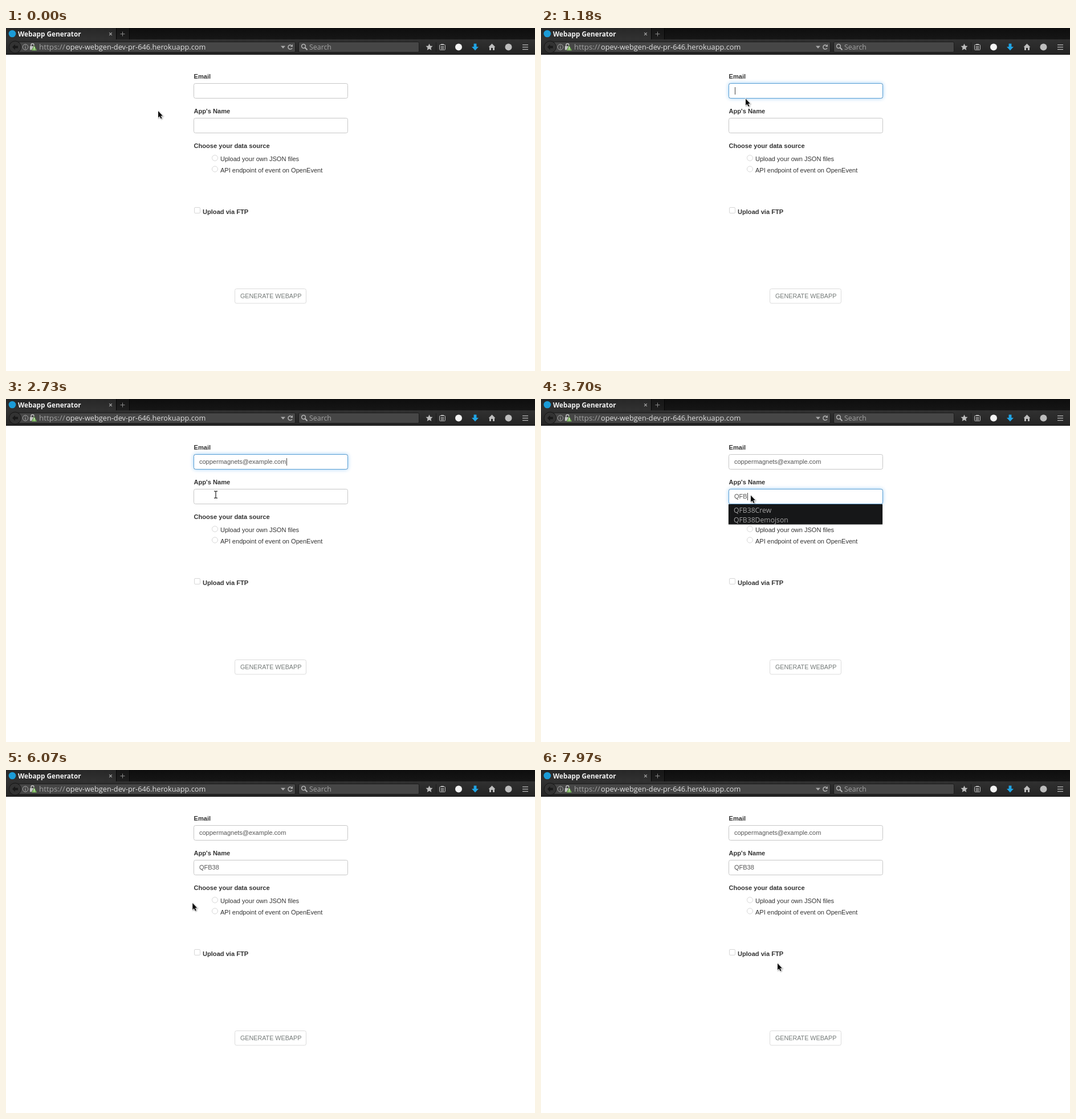
An HTML page with a canvas for the animation above (8 s loop, 928 by 603 pixels).

```html
<!DOCTYPE html>
<html lang="en">
<head>
<meta charset="utf-8">
<title>Webapp Generator</title>
<style>
  html, body { margin: 0; width: 100%; height: 100%; overflow: hidden; background: #fff; }
  canvas { display: block; }
</style>
</head>
<body>
<canvas id="stage" width="928" height="603"></canvas>
<script>
const ctx = document.getElementById('stage').getContext('2d', { alpha: false });
const LOOP = 8000;
const PAGE = '"Liberation Sans", Arial, sans-serif';
const CHROME = '"Open Sans", "Noto Sans", sans-serif';
const TEXT = '#555';
const EMAIL = 'coppermagnets@example.com';
const EMAIL_ROWS = ['coppermagnets', EMAIL, 'coppermagnets@example.org',
  'copperkettle@example.com', 'cobaltgarden@example.net', 'cedarwindow@example.org'];
const APP_ROWS = ['QFB38Crew', 'QFB38Demojson', 'Quartz'];
const ROW = 17.7;

// Pointer path: time, x, y
const PATH = [
  [0, 267, 146], [50, 267, 146], [430, 343, 109], [560, 351, 106], [830, 351, 106],
  [1030, 359, 124.5], [1710, 359, 124.5], [2300, 366, 152], [2450, 367, 158],
  [2700, 368, 168], [3490, 368, 169.5], [5310, 368, 169.5], [5510, 150, 239],
  [5630, 150, 239], [5800, 196, 244], [6070, 327, 234], [6150, 349, 236],
  [6920, 432, 456], [6960, 433, 465], [7850, 433, 465], [7890, 430, 438],
  [7970, 415, 340], [8000, 415, 340]
];

const within = (t, a, b) => t >= a && t < b;
const ramp = (t, start) => Math.min(1, Math.max(0, (t - start) / 150));

function pointerAt(t) {
  const i = Math.max(1, PATH.findIndex(p => p[0] > t));
  const [t0, x0, y0] = PATH[i - 1], [t1, x1, y1] = PATH[i];
  const k = (t - t0) / (t1 - t0);
  return { x: x0 + (x1 - x0) * k, y: y0 + (y1 - y0) * k };
}

function text(str, x, y, font, color) {
  ctx.font = font;
  ctx.fillStyle = color;
  ctx.fillText(str, x, y);
}

function rect(x, y, w, h, color) {
  ctx.fillStyle = color;
  ctx.fillRect(x, y, w, h);
}

function box(x, y, w, h, r, fill, stroke, width = 1) {
  ctx.beginPath();
  ctx.roundRect(x, y, w, h, r);
  paint(fill, stroke, width);
}

function disc(x, y, r, fill, stroke, width = 1) {
  ctx.beginPath();
  ctx.arc(x, y, r, 0, Math.PI * 2);
  paint(fill, stroke, width);
}

function shape(d, x, y, fill, stroke, width = 1) {
  ctx.save();
  ctx.translate(x, y);
  const path = new Path2D(d);
  if (stroke) { ctx.strokeStyle = stroke; ctx.lineWidth = width; ctx.stroke(path); }
  if (fill) { ctx.fillStyle = fill; ctx.fill(path); }
  ctx.restore();
}

function paint(fill, stroke, width) {
  if (fill) { ctx.fillStyle = fill; ctx.fill(); }
  if (stroke) { ctx.strokeStyle = stroke; ctx.lineWidth = width; ctx.stroke(); }
}

function gradient(y0, y1, from, to) {
  const g = ctx.createLinearGradient(0, y0, 0, y1);
  g.addColorStop(0, from);
  g.addColorStop(1, to);
  return g;
}

function drawTabs() {
  rect(0, 0, 928, 20, gradient(0, 20, '#0e0e0e', '#161616'));
  rect(0, 0, 193, 20, gradient(0, 20, '#272727', '#313131'));
  rect(193, 0, 1, 20, '#050505');
  rect(194, 0, 22, 20, gradient(0, 20, '#161616', '#1f1f1f'));
  rect(216, 0, 1, 20, '#050505');
  disc(11, 10, 6.3, '#1b9cd8');
  text('Webapp Generator', 21, 14.5, `bold 11.75px ${CHROME}`, '#f2f2f2');
  shape('M-2.3-2.3 2.3 2.3M2.3-2.3-2.3 2.3', 183.5, 10.5, null, '#aaa', 1.2);
  shape('M-4 0H4M0-4V4', 204.5, 10.5, null, '#8a8a8a');
}

function drawAddressBar() {
  rect(0, 20, 928, 27, gradient(20, 46, '#313131', '#242424'));
  rect(0, 46, 928, 1, '#101010');
  box(18.5, 24.5, 489, 18, 2, '#464646', '#1b1b1b');
  box(513.5, 24.5, 211, 18, 2, '#464646', '#1b1b1b');

  disc(16, 33.5, 10.5, '#333', '#151515');
  shape('M-5 0 0-5V-2H5V2H0V5Z', 16, 33.5, '#191919');
  disc(34, 33.5, 4.8, null, '#a8a8a8');
  rect(33.5, 32.5, 1, 4, '#b0b0b0');
  rect(33.5, 30.5, 1, 1, '#b0b0b0');
  shape('M-2.5 0V-2A2.5 2.5 0 0 1 2.5-2V0', 46.5, 32, null, '#c4c4c4', 1.4);
  rect(42, 32, 9, 6.5, '#c4c4c4');
  shape('M0-6 4.5 3H-4.5Z', 49.5, 36.5, '#79b75a', '#444');
  rect(49, 33.5, 1, 3, '#fff');
  rect(49, 37.5, 1, 1, '#fff');

  text('https://', 58, 38, `13.4px ${CHROME}`, '#a2a2a2');
  text('opev-webgen-dev-pr-646.herokuapp.com', 105, 38, `12.75px ${CHROME}`, '#e0e0e0');
  shape('M-4-2H4L0 2.5Z', 486, 33.5, '#aaa');
  shape('M3.3-1.8A3.7 3.7 0 1 0 3.4 1.8', 498.5, 33.5, null, '#aaa', 1.6);
  shape('M4.5-5V-.5H0Z', 498.5, 33.5, '#aaa');
  disc(522, 32, 3.4, null, '#b5b5b5', 1.5);
  shape('M0 0 4 4', 524.5, 34.5, null, '#b5b5b5', 1.9);
  text('Search', 532, 38, `12.4px ${CHROME}`, '#a2a2a2');
}

function drawToolbarIcons() {
  const ink = '#bdbdbd';
  shape('M0-6 1.8-2.1 6-1.7 2.9 1.2 3.8 5.4 0 3.2-3.8 5.4-2.9 1.2-6-1.7-1.8-2.1Z', 742.5, 33.5, ink);
  rect(754, 25, 1, 17, '#1c1c1c');
  box(760.5, 29.5, 10, 9, 1, null, ink);
  rect(763, 28, 5, 2, ink);
  for (const y of [32, 34, 36]) rect(762.5, y, 6, 1, ink);
  disc(794, 33.5, 6, '#f4f4f4');
  shape('M-2.4-6H2.4V-.5H6L0 6-6-.5H-2.4Z', 823, 33.5, '#20a4e4');
  shape('M0-6 6 0H4.5V5.5H1.5V1.5H-1.5V5.5H-4.5V0H-6Z', 852.5, 33.5, ink);
  disc(881.5, 33.5, 6, ink);
  for (const y of [29, 33, 37]) rect(906, y, 10, 1.2, ink);
}

function drawField(y, value, focus, caret) {
  if (focus > 0) {
    ctx.save();
    ctx.shadowColor = `rgba(82,168,236,${0.65 * focus})`;
    ctx.shadowBlur = 7;
    box(329.5, y, 270, 26, 3, '#fff');
    ctx.restore();
  }
  box(329.5, y, 270, 26, 3, '#fff', '#c6c6c6');
  if (focus > 0) {
    ctx.globalAlpha = focus;
    box(329.5, y, 270, 26, 3, null, '#5a9fd4');
    ctx.globalAlpha = 1;
  }
  text(value, 339, y + 16.5, `11px ${PAGE}`, TEXT);
  if (caret) rect(Math.round(339.5 + ctx.measureText(value).width), y + 6.5, 1, 13, '#444');
}

function drawForm(s) {
  const label = (str, x, y) => text(str, x, y, `bold 11.1px ${PAGE}`, '#333');
  const option = (str, y) => {
    disc(366.5, y - 5.5, 5, '#fff', '#d6d6d6');
    text(str, 376, y, `11.05px ${PAGE}`, '#333');
  };
  label('Email', 329.5, 89);
  label("App's Name", 329.5, 150);
  label('Choose your data source', 329.5, 211);
  option('Upload your own JSON files', 234);
  option('API endpoint of event on OpenEvent', 253.5);
  box(330.5, 315.5, 10, 10, 1.5, '#fff', '#d6d6d6');
  label('Upload via FTP', 345, 327);
  box(401.5, 458.5, 125, 25.5, 3, '#fff', '#dcdcdc');
  text('GENERATE WEBAPP', 411, 475, `10.75px ${PAGE}`, '#747a78');
  drawField(97.5, s.email, s.emailFocus, s.emailCaret);
  drawField(158.5, s.app, s.appFocus, s.appCaret);
}

function drawPopup(top, rows, pointer) {
  const height = rows.length * ROW;
  ctx.save();
  ctx.shadowColor = 'rgba(0,0,0,.3)';
  ctx.shadowBlur = 3;
  ctx.shadowOffsetY = 1;
  rect(329, top, 270, height, '#161718');
  ctx.restore();
  const active = Math.floor((pointer.y - top) / ROW);
  rows.forEach((row, i) => {
    if (i === active) rect(329, top + i * ROW, 270, ROW, '#303234');
    text(row, 338, top + 15 + i * 17.2, `12.2px ${CHROME}`, '#a3a3a3');
  });
}

function drawTooltip() {
  box(434.5, 482.5, 230, 19, 2, '#161718', '#333');
  text('Please fill in all the required fields', 441, 496.5, `12.2px ${CHROME}`, '#d0d0d0');
}

function drawPointer({ x, y }, kind) {
  if (kind === 'beam') {
    const d = 'M-3-6H-1Q0-6 0-5Q0-6 1-6H3M0-5V5M-3 6H-1Q0 6 0 5Q0 6 1 6H3';
    shape(d, x, y, null, 'rgba(255,255,255,.8)', 2.6);
    shape(d, x, y, null, '#222', 1.2);
  } else if (kind === 'blocked') {
    disc(x, y, 6.5, null, '#fff', 4);
    shape('M-4.5-4.5 4.5 4.5', x, y, null, '#fff', 4);
    disc(x, y, 6.5, null, '#222', 2.2);
    shape('M-4.5-4.5 4.5 4.5', x, y, null, '#222', 2.2);
  } else if (kind === 'arrow') {
    const d = 'M0 0V11.6L2.6 9.2 4.6 13.6 6.5 12.7 4.5 8.5H8Z';
    ctx.save();
    ctx.shadowColor = 'rgba(0,0,0,.45)';
    ctx.shadowBlur = 2;
    ctx.shadowOffsetX = ctx.shadowOffsetY = 0.8;
    shape(d, x, y, null, '#fff', 1.3);
    ctx.restore();
    shape(d, x, y, '#0a0a0a');
  }
}

function pointerKind(t, { x, y }, popup) {
  if (within(t, 1570, 1710)) return 'none';
  if (within(t, 6960, 7890)) return 'blocked';
  const inField = x > 329 && x < 600 && (within(y, 97, 124) || within(y, 158, 185));
  return inField && !popup ? 'beam' : 'arrow';
}

function appName(t) {
  const keys = [3490, 3590, 3700, 4880, 5170];
  return 'QFB38'.slice(0, keys.filter(k => t >= k).length);
}

function draw(t) {
  const pointer = pointerAt(t);
  const emailPopup = within(t, 690, 1180) || within(t, 1710, 2450);
  const appPopup = within(t, 3490, 5560);

  rect(0, 0, 928, 603, '#fff');
  drawTabs();
  drawAddressBar();
  drawToolbarIcons();
  drawForm({
    email: t < 1710 ? '' : t < 2450 ? EMAIL[0] : EMAIL,
    emailFocus: ramp(t, 450) * (1 - ramp(t, 2850)),
    emailCaret: within(t, 450, 2850),
    app: appName(t),
    appFocus: ramp(t, 2850) * (1 - ramp(t, 5560)),
    appCaret: within(t, 2850, 5560)
  });
  if (emailPopup) drawPopup(124, EMAIL_ROWS, pointer);
  if (appPopup) drawPopup(185, APP_ROWS.slice(0, t < 3590 ? 3 : 2), pointer);
  if (within(t, 7600, 7890)) drawTooltip();
  drawPointer(pointer, pointerKind(t, pointer, emailPopup || appPopup));
}

const start = performance.now();
function tick() {
  draw((performance.now() - start) % LOOP);
  requestAnimationFrame(tick);
}
tick();
</script>
</body>
</html>
```
